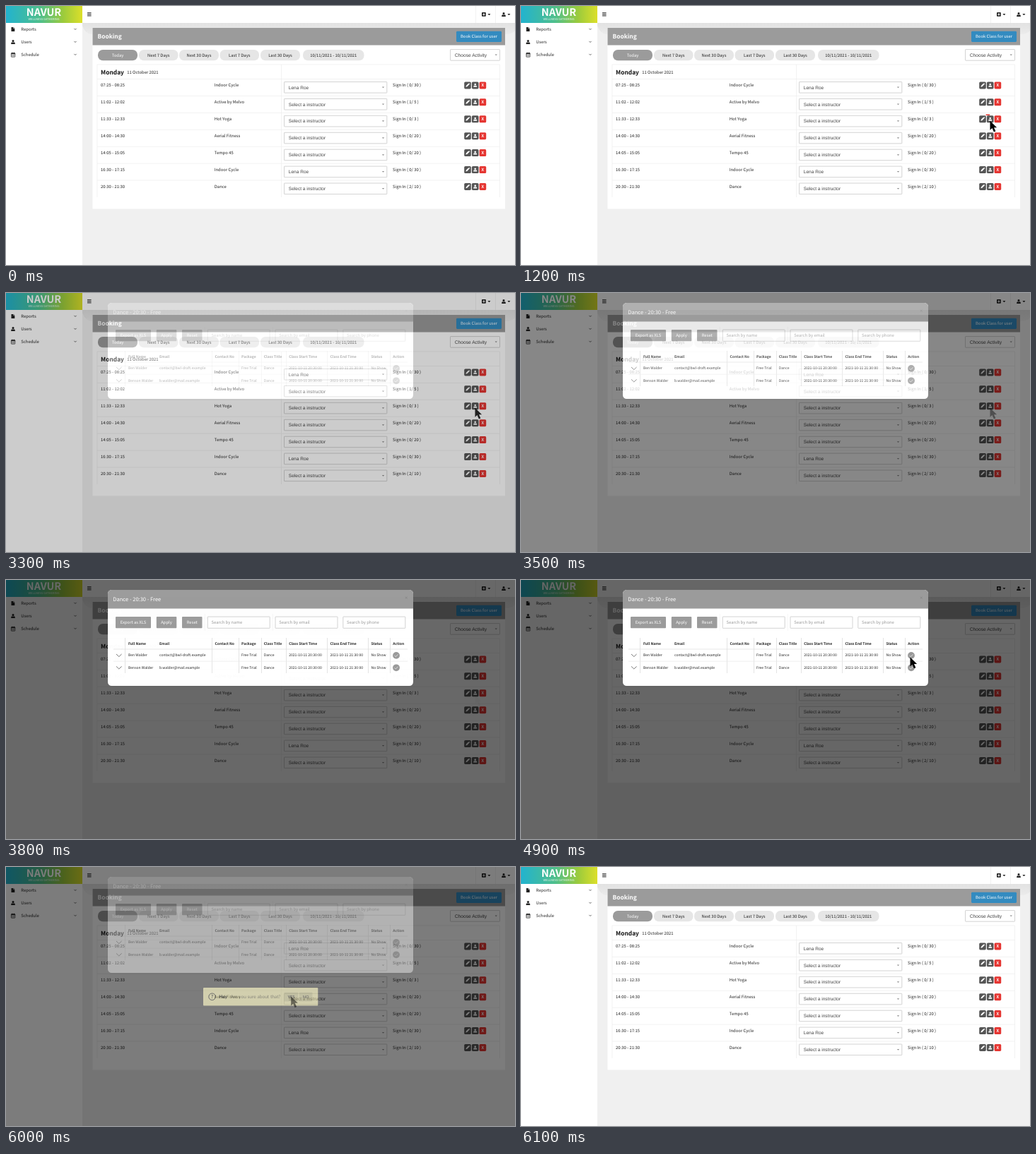
An HTML page for the animation above (6.6 s loop, 720 by 367 pixels).

```html
<!DOCTYPE html>
<html lang="en">
<head>
<meta charset="utf-8">
<title>Class booking</title>
<style>
  html, body { margin: 0; width: 100%; height: 100%; overflow: hidden; background: #f0f0f0; }
  svg { display: block; width: 100vw; height: 100vh; }
  text {
    font-family: "Noto Sans CJK JP", "Noto Sans CJK SC", "Noto Sans CJK", "Noto Sans", sans-serif;
    text-rendering: geometricPrecision;
    white-space: pre;
  }
  .ui { font-family: "Liberation Sans", Arial, sans-serif; }
  .lato { font-family: Lato, sans-serif; }
  .b { font-weight: 700; }
  .mid { text-anchor: middle; }
  .ring { fill: none; stroke: #e2231a; stroke-width: 1.4; }
</style>
</head>
<body>
<svg id="stage" viewBox="0 0 720 367" xmlns="http://www.w3.org/2000/svg">
  <defs>
    <linearGradient id="brand">
      <stop offset="0" stop-color="#22b3cf"/>
      <stop offset=".45" stop-color="#4fbf8b"/>
      <stop offset=".75" stop-color="#9ccb3c"/>
      <stop offset="1" stop-color="#dcdf2a"/>
    </linearGradient>
    <linearGradient id="shade" x2="0" y2="1">
      <stop offset="0" stop-color="#e2e2e2"/>
      <stop offset="1" stop-color="#ebebeb"/>
    </linearGradient>
    <path id="arrow" d="M0 0V13L3 10.3L5.4 15.8L7.9 14.7L5.5 9.4H9.6Z"/>
    <path id="person" d="M0-3a1.55 1.55 0 0 1 0 3.1a1.55 1.55 0 0 1 0-3.1M-2.8 2.9V1.9Q-2.8.4-1.2.3Q0 1 1.2.3Q2.8.4 2.8 1.9V2.9Z"/>
    <path id="caret" d="M-2-1H2L0 1.2Z"/>
    <path id="chevron" d="M-1.6-.8L0 .8L1.6-.8" fill="none" stroke="#444" stroke-width=".8"/>
  </defs>
  <g id="page"></g>
  <use id="pageCursor" href="#arrow"/>
  <g id="modal"></g>
  <g id="toast"></g>
  <rect id="ringUser" class="ring" x="657.6" y="154.2" width="12" height="12" pathLength="1"/>
  <circle id="ringTick" class="ring" cx="552" cy="111" r="6.2"/>
  <circle id="ringYes" class="ring" cx="403" cy="186.5" r="6.6"/>
  <use id="topCursor" href="#arrow"/>
</svg>
<script>
const $ = id => document.getElementById(id);
const GREY = '#9b9b9b';

// y is the vertical middle of the line
const text = (x, y, s, size = 5.9, fill = '#222', cls = '') =>
  `<text x="${x}" y="${y + size * .36}" font-size="${size}" fill="${fill}" class="${cls}">${s}</text>`;
const box = (x, y, w, h, fill, r = 0, extra = '') =>
  `<rect x="${x}" y="${y}" width="${w}" height="${h}" rx="${r}" fill="${fill}" ${extra}/>`;
const field = (x, y, w, h) => box(x, y, w, h, '#fff', .5, 'stroke="#c8c8c8" stroke-width=".8"');
const line = (x1, y1, x2, y2, c = '#ececec', w = .7) =>
  `<path d="M${x1} ${y1}L${x2} ${y2}" stroke="${c}" stroke-width="${w}" fill="none"/>`;
const icon = (id, x, y, fill = '#222', scale = 1) =>
  `<use href="#${id}" transform="translate(${x} ${y}) scale(${scale})" fill="${fill}"/>`;
const select = (x, y, w, h, label, size) =>
  field(x, y, w, h) + text(x + 6.3, y + h / 2, label, size, '#444', 'ui') +
  icon('caret', x + w - 5.3, y + h / 2, '#888', .8);

function sidebar() {
  const file = '<path d="M7.5 30H10.3V32H12.3V36H7.5ZM10.8 30L12.3 31.5H10.8Z" fill="#222"/>';
  const calendar = box(7.4, 66.8, 5.4, 5.4, 'none', .4, 'stroke="#222" stroke-width=".7"') +
    box(7.4, 66.6, 5.4, 1.6, '#222') + line(8.8, 65.6, 8.8, 67, '#222') + line(11.4, 65.6, 11.4, 67, '#222') +
    line(8.2, 69.4, 12, 69.4, '#222', .5) + line(8.2, 70.9, 12, 70.9, '#222', .5);
  return box(0, 0, 108, 367, '#fff') + box(0, 0, 108, 24, 'url(#brand)') +
    text(53.5, 9, 'NAVUR', 14.5, '#fff', 'b mid') +
    text(53.5, 18.6, 'WELLNESS GATHERING', 4.1, '#e8f6ee', 'mid') +
    file + icon('person', 10, 51) + calendar +
    ['Reports', 'Users', 'Schedule'].map((s, i) =>
      text(21.3, 33 + i * 18, s) + icon('chevron', 98, 32.7 + i * 18)).join('');
}

function topbar() {
  return '<path d="M108 24H720V35Q716 40 706 40H122Q112 40 108 28Z" fill="url(#shade)"/>' +
    box(108, 0, 612, 24, '#fff') +
    [9.7, 11.8, 13.9].map(y => line(115, y, 120.6, y, '#222', 1)).join('') +
    line(664.5, 0, 664.5, 24) + line(692.5, 0, 692.5, 24) +
    box(673, 9, 5.8, 5.8, '#222', .8) + line(674.2, 11.9, 677.6, 11.9, '#fff', 1) + line(675.9, 10.2, 675.9, 13.6, '#fff', 1) +
    icon('caret', 683.4, 12) + icon('person', 704, 12) + icon('caret', 711.4, 12);
}

function actions(y) {
  const pencil = `<path d="M650.4 ${y + 2.4}l.5-1.9l3.3-3.3l1.4 1.4l-3.3 3.3ZM654.7 ${y - 2.8}l.5-.4l1.3 1.3l-.5.5Z" fill="#fff"/>`;
  return box(648.2, y - 5, 9.6, 10, '#555', 1.6) + pencil +
    box(658.9, y - 5, 9.6, 10, '#555', 1.6) + icon('person', 663.7, y, '#fff', .85) +
    box(669.6, y - 5, 9.6, 10, '#e53531', 1.6) + text(674.4, y, 'X', 5.8, '#fff', 'b mid');
}

function booking() {
  const tabs = [['Today', 130, 56], ['Next 7 Days', 188, 55.5], ['Next 30 Days', 245, 56],
    ['Last 7 Days', 302.5, 55.5], ['Last 30 Days', 360, 56], ['10/11/2021 - 10/11/2021', 420, 86.5]];
  const rows = [
    ['07:25 - 08:25', 'Indoor Cycle', 1, '0/ 30'],
    ['11:02 - 12:02', 'Active by Melvo', 0, '1/ 5'],
    ['11:33 - 12:33', 'Hot Yoga', 0, '0/ 3'],
    ['14:00 - 14:30', 'Aerial Fitness', 0, '0/ 20'],
    ['14:05 - 15:05', 'Tempo 45', 0, '0/ 20'],
    ['16:30 - 17:15', 'Indoor Cycle', 1, '0/ 30'],
    ['20:30 - 21:30', 'Dance', 0, '2/ 10']];
  return box(122.5, 31, 583.5, 256.5, '#fff') + box(122.5, 31, 583.5, 24.5, GREY) +
    text(129.5, 43.3, 'Booking', 8.4, '#fff', 'b') +
    box(637, 35.8, 64, 15.2, '#338bc0', 1.4) + text(669, 43.3, 'Book Class for user', 5.9, '#fff', 'mid') +
    tabs.map(([s, x, w], i) => box(x, 62, w, 15.2, i ? '#e6e6e6' : GREY, 7) +
      text(x + w / 2, 69.6, s, 5.9, i ? '#222' : '#fff', 'mid')).join('') +
    select(628.5, 61.6, 70, 15.6, 'Choose Activity', 6.65) +
    line(129, 83, 698.5, 83) + line(389.5, 83, 389.5, 271) + line(698.5, 83, 698.5, 271) + line(129, 83, 129, 271) +
    text(134, 93.7, 'Monday', 8.4, '#111', 'b') + text(171.2, 94.3, '11 October 2021') +
    rows.map(([time, name, taken, count], i) => {
      const y = 112.4 + i * 23.92;
      return line(129, y - 8.9, 698.5, y - 8.9) + text(134, y - .3, time) + text(294.8, y - .3, name) +
        select(393.5, y - 4.9, 145.3, 15.6, taken ? 'Lena Roe' : 'Select a instructor', 6.55) +
        text(547, y - .3, `Sign In ( ${count} )`) + actions(y);
    }).join('');
}

function attendees() {
  const cols = [173, 217, 295.5, 333, 364.8, 400.2, 458.5, 516.5, 547.3];
  const heads = ['Full Name', 'Email', 'Contact No', 'Package', 'Class Title',
    'Class Start Time', 'Class End Time', 'Status', 'Action'];
  const shared = ['', 'Free Trial', 'Dance', '2021-10-11 20:30:00', '2021-10-11 21:30:00', 'No Show'];
  const people = [['Ben Walder', 'contact@bwl-draft.example'], ['Benson Walder', 'b.walder@mail.example']];
  const button = (s, x, w) => box(x, 52, w, 16.3, GREY, 1) + text(x + w / 2, 60, s, 5.9, '#fff', 'mid');
  return box(0, 0, 720, 367, '#000', 0, 'opacity=".6"') +
    box(144, 14, 432, 136, '#fff', 5.5) +
    `<path d="M144 40.5V19.5a5.5 5.5 0 0 1 5.5-5.5H570.5a5.5 5.5 0 0 1 5.5 5.5V40.5Z" fill="${GREY}"/>` +
    text(151.3, 27.3, 'Dance - 20:30 - Free', 7.55, '#fff') + text(566.3, 25, '×', 5, '#777', 'mid') +
    button('Export as XLS', 155, 50) + button('Apply', 212.8, 28.5) + button('Reset', 249, 28.5) +
    ['name', 'email', 'phone'].map((s, i) => field(285.2 + i * 95.8, 52, 88, 16.3) +
      text(290.5 + i * 95.8, 60, 'Search by ' + s, 5.9, '#999')).join('') +
    line(281.3, 48, 281.3, 72, '#f2f2f2') + line(377.3, 48, 377.3, 72, '#f2f2f2') +
    [168.5, 291.5, 329.5, 361.5, 396.5, 454.5, 512.5, 543.5].map(x => line(x, 82, x, 132, '#ddd', .8)).join('') +
    line(152, 98, 568, 98, '#ddd') + line(152, 115.2, 568, 115.2, '#e8e8e8') +
    heads.map((s, i) => text(cols[i], 89.8, s, 5.05, '#222', 'b')).join('') +
    people.map((who, i) => {
      const y = 106.6 + i * 17.4;
      return `<path d="M156 ${y - 1.6}L159.8 ${y + 2}L163.6 ${y - 1.6}" fill="none" stroke="#777" stroke-width="1"/>` +
        [...who, ...shared].map((s, k) => text(cols[k], y, s, 5.05)).join('') +
        `<circle cx="552" cy="${y + .3}" r="4.9" fill="#999"/>` +
        `<path d="M549.6 ${y + .4}l1.7 1.7l3.2-3.3" fill="none" stroke="#ddd" stroke-width="1"/>`;
    }).join('');
}

function confirmation() {
  return box(0, 0, 720, 367, '#000', 0, 'opacity=".6"') +
    box(279, 171, 162.3, 25.6, '#fff9b2', 1, 'opacity=".92"') +
    '<circle cx="291.6" cy="183.8" r="4.8" fill="none" stroke="#222" stroke-width="1"/>' +
    text(291.6, 183.8, '?', 7, '#222', 'lato b mid') +
    text(301.2, 183.3, 'Hey', 6.6, '#111', 'lato b') +
    text(317.4, 183.3, 'Are you sure about that?', 6.6, 'rgba(0,0,0,.6)', 'lato') +
    box(393.5, 177.4, 19.7, 13.2, 'rgba(0,0,0,.12)', .8) + box(414.8, 177.4, 18.6, 13.2, 'rgba(0,0,0,.12)', .8) +
    text(403.4, 184, 'YES', 5.65, '#222', 'lato b mid') + text(424.1, 184, 'NO', 5.65, '#222', 'lato mid');
}

$('page').innerHTML = box(0, 0, 720, 367, '#f0f0f0') + topbar() + sidebar() + booking();
$('modal').innerHTML = attendees();
$('toast').innerHTML = confirmation();

const LOOP = 6600, STEP = 100;
const show = (id, opacity) => $(id).setAttribute('opacity', opacity);
const move = (id, x, y) => $(id).setAttribute('transform', `translate(${x} ${y})`);
const easeInOut = x => x < .5 ? 8 * x ** 4 : 1 - 8 * (1 - x) ** 4;
const clamp = x => Math.min(1, Math.max(0, x));
// short flash: three steps, then off
const flash = (t, start) => [.5, 1, .5][(t - start) / STEP] || 0;

function draw(t) {
  const out = t < 6000 ? 1 : t < 6100 ? .5 : 0;
  const fade = easeInOut(clamp((t - 2670) / 1400)) * out;

  show('modal', fade);
  show('toast', t >= 5100 ? out : 0);

  // dims the pointer so that it cross-fades evenly under the backdrop
  show('pageCursor', t < 600 || t > 4000 ? 0 : 1 - .4 * fade / (1 - .6 * fade));
  if (t < 700) move('pageCursor', 356.3, 175.4);
  else move('pageCursor', 663.5, 162.8);

  show('topCursor', t >= 4200 ? out : 0);
  if (t < 5300) move('topCursor', 375.5 + 175 * clamp((t - 4200) / 200), 109.5);
  else move('topCursor', 403.2, 183.4);

  const drawn = clamp((t - 900) / 1400) ** 1.4;
  $('ringUser').setAttribute('stroke-dasharray', `${drawn} 2`);
  show('ringUser', t < 1000 ? 0 : clamp((2600 - t) / 300));
  show('ringTick', flash(t, 4600));
  show('ringYes', flash(t, 5500));
}

const start = performance.now();
function tick() {
  const t = (performance.now() - start + 4) % LOOP;
  draw(Math.floor(t / STEP) * STEP);
  requestAnimationFrame(tick);
}
tick();
</script>
</body>
</html>
```
